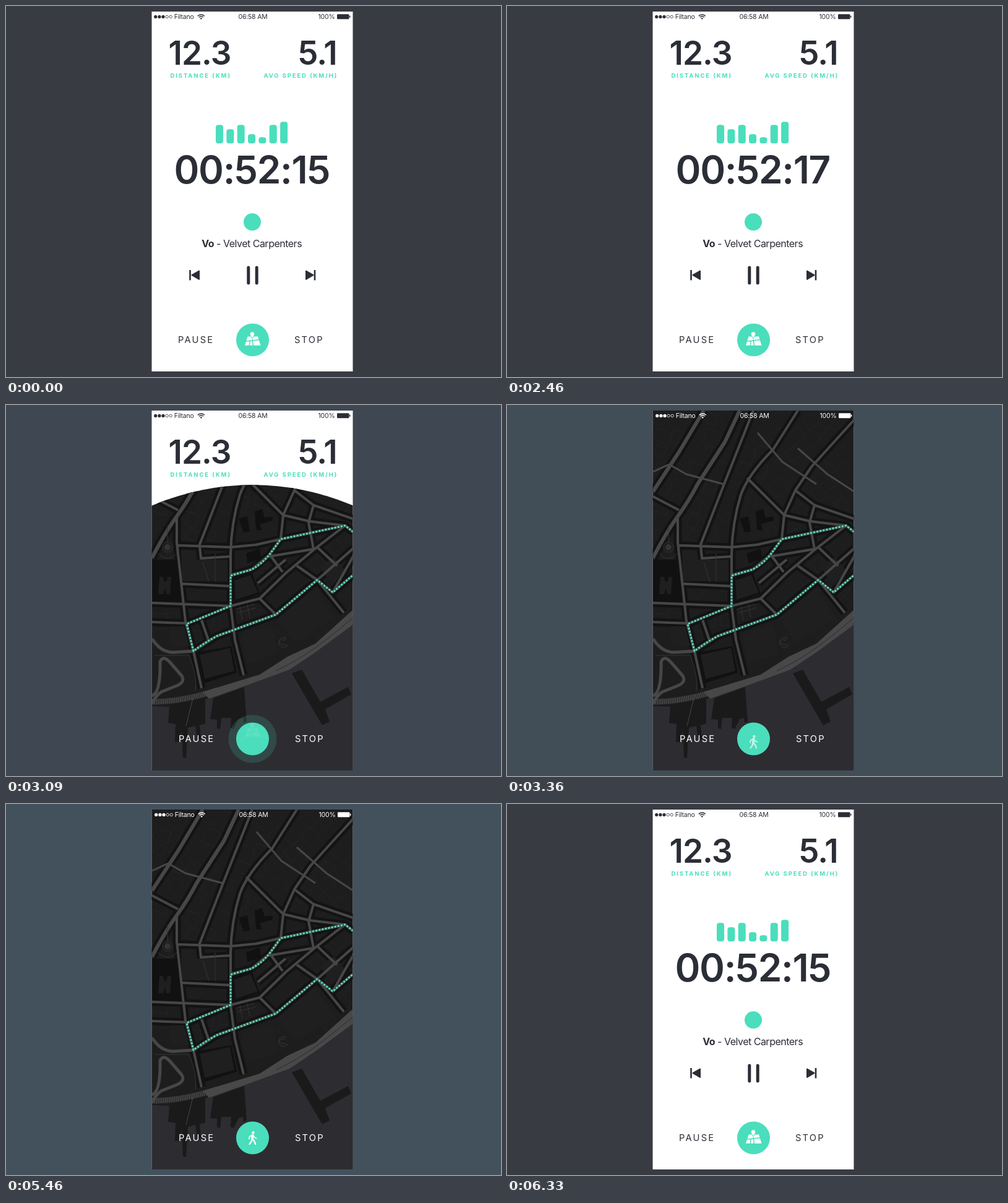
Write an HTML page that moves like this. It is 800x600 px and loops after 6360 ms.

```html
<!DOCTYPE html>
<html lang="en">
<head>
<meta charset="utf-8">
<title>Run tracker</title>
<style>
  html, body { margin: 0; width: 100%; height: 100%; overflow: hidden; background: #393b43; }
  svg { display: block; width: 800px; height: 600px; }
  text { font-family: Inter, "Open Sans", sans-serif; fill: currentColor; white-space: pre; }
  .num { font-weight: 600; }
  .cap { font-weight: 700; fill: #4adebc; }
  .road { fill: none; stroke: #474747; stroke-linejoin: round; }
</style>
</head>
<body>
<svg viewBox="0 0 800 600">
  <defs>
    <clipPath id="screen"><rect x="235.5" y="9" width="325" height="582"/></clipPath>
    <clipPath id="reveal"><circle id="hole" cx="398.5" cy="540" r="0"/></clipPath>
    <radialGradient id="glow">
      <stop offset="0" stop-color="#4adebc" stop-opacity=".5"/>
      <stop offset=".5" stop-color="#4adebc" stop-opacity=".16"/>
      <stop offset="1" stop-color="#4adebc" stop-opacity="0"/>
    </radialGradient>

    <!-- status bar and bottom labels, coloured by the layer that uses them -->
    <g id="chrome">
      <g fill="currentColor">
        <circle cx="241.7" cy="17.4" r="2.6"/><circle cx="247.9" cy="17.4" r="2.6"/><circle cx="254" cy="17.4" r="2.6"/>
        <rect x="535" y="13.3" width="19.5" height="8" rx="1.2"/><rect x="555" y="15.6" width="1.4" height="3.4" rx=".7"/>
        <circle cx="315.3" cy="20.3" r="1.2"/>
      </g>
      <g fill="none" stroke="currentColor">
        <circle cx="260.1" cy="17.4" r="2.2" stroke-width=".8"/><circle cx="266.2" cy="17.4" r="2.2" stroke-width=".8"/>
        <path d="M309.8 16.2a8 8 0 0 1 11 0M311.8 18.3a5 5 0 0 1 7 0" stroke-width="1.5"/>
      </g>
      <g font-size="10.5" letter-spacing="-.2">
        <text x="271.7" y="21.3">Filtano</text>
        <text x="375.5" y="21.3">06:58 AM</text>
        <text x="504.5" y="21.3">100%</text>
      </g>
      <g font-size="14.7" letter-spacing="2.2">
        <text x="278" y="545">PAUSE</text>
        <text x="466" y="545">STOP</text>
      </g>
    </g>

    <path id="streets" d="M276 180V222L290 350 303 398 316 458M312 228L352 125 398 9M363 325V240Q364 190 378 145 390 112 430 72L470 9
      M278 227L363 230 404 226 444 217M313 228L315 248 363 245M283 289L363 293M236 320L363 325M236 351L292 353
      M293 354L363 325 410 313 452 272 500 232 548 195M303 398L340 374 436 339 503 283 561 232
      M363 275L397 266 425 243 444 217 548 195 561 206M444 217L448 178 466 138 492 100 561 24
      M388 118L448 178 490 188 548 195M466 138L497 162 561 184M497 162L489 190 497 233 425 245M236 148L278 170
      M407 288L452 250M410 313L436 339M427 243L447 270M470 260L503 283 546 336M503 230L535 260M561 245L528 303 561 275
      M363 325L370 380 384 437M316 348L327 380"/>
    <path id="avenue" d="M236 247Q258 205 276 180T308 128L352 60 376 9M236 140L278 76 318 9"/>
    <path id="route" d="M561 205L548 195 444 217 425 243Q412 258 397 266L363 276V325L292 354 303 398Q320 385 340 374L436 339 503 283 528 303 561 275"/>
  </defs>

  <g clip-path="url(#screen)">
    <g color="#2b2e36">
      <rect x="235" y="9" width="326" height="583" fill="#fff"/>
      <use href="#chrome"/>
      <g class="num" font-size="53" letter-spacing="-1">
        <text x="262.6" y="95.3">12.3</text>
        <text x="472" y="95.3">5.1</text>
      </g>
      <g font-size="9.5" letter-spacing="1.9">
        <text class="cap" x="265.5" y="115.5">DISTANCE (KM)</text>
        <text class="cap" x="416.5" y="115.5">AVG SPEED (KM/H)</text>
      </g>
      <g id="bars" fill="#4adebc"></g>
      <text id="clock" class="num" x="397.3" y="286.5" font-size="62" letter-spacing="-1.3" text-anchor="middle"></text>
      <circle cx="398" cy="349.3" r="14" fill="#4adebc"/>
      <text x="397.2" y="390" font-size="16" letter-spacing="-.5" text-anchor="middle"><tspan font-weight="700">Vo</tspan> - Velvet Carpenters</text>
      <g fill="currentColor" stroke="currentColor" stroke-linejoin="round">
        <path d="M312 428.5V442L300.5 435.2ZM485 428.5V442L496.5 435.2Z" stroke-width="2"/>
        <path d="M297.5 427V443.4M499 427V443.4" stroke-width="2.6"/>
        <path d="M391.8 423V448M405.2 423V448" stroke-width="5" stroke-linecap="round"/>
      </g>
    </g>

    <g clip-path="url(#reveal)" color="#fff">
      <rect x="235" y="9" width="326" height="583" fill="#1d1d1d"/>
      <g id="lots" fill="none" stroke="#282828" stroke-width=".8"></g>
      <g fill="none" stroke="#131313">
        <use href="#streets" stroke-width="13"/>
        <use href="#avenue" stroke-width="15"/>
      </g>
      <g fill="#111">
        <path d="M236 250H278L283 318H236ZM308 400L364 390 373 433 320 450ZM402 172L414 168 418 182 431 180V187L410 193 414 203 404 202ZM376 184L390 180 394 205 384 206Z"/>
        <path d="M366 280L397 270 410 305 368 320ZM388 240L410 232 412 248 390 256Z"/>
      </g>
      <g fill="#1f1f1f">
        <path d="M313 404L362 393 369 430 321 443ZM380 372L431 356 440 402 389 419ZM440 344L500 296 531 345 465 385ZM369 284L395 275 407 303 371 315Z"/>
        <path d="M248 278H254L256 286H259L261 278H267L265 306H259L257 296 254 306H246ZM283 235H307V250H358V285H284ZM263 358H288L296 390H268ZM507 262L530 246 548 268 528 292Z"/>
      </g>
      <path d="M561 348L500 396 455 428 385 453 330 474 264 488 236 487V592H561Z" fill="#2d2c31"/>
      <path d="M264 487L322 469V515L313 518 315 541 309 540 306 519 294 522 291 571 286 570 284 526 280 545 273 545 274 516 262 514Z
        M335 474L385 456 389 512 384 514 383 506 376 508 368 524 363 522 364 506 348 506 346 524 341 523 341 509 330 508Z
        M462 434L478 428 508 480 553 456 558 468 516 492 523 512 511 518Z" fill="#1a1a1a"/>
      <path d="M303 470L291 519" stroke="#454545" fill="none"/>

      <g class="road">
        <use href="#avenue" stroke-width="6"/>
        <path d="M236 378Q250 400 270 400L303 398M236 470Q250 466 249 415 254 404 265 416L284 438Q290 448 276 454L256 462Q246 464 236 482" stroke-width="5"/>
        <use href="#streets" stroke-width="4"/>
        <path d="M405 45L445 92 500 128M236 108L262 96 290 112 350 128M470 70L518 112 561 140" stroke-width="3"/>
      </g>
      <g fill="none" stroke="#353535">
        <circle cx="261" cy="230" r="8"/><circle cx="261" cy="230" r="4.5" fill="#333"/>
        <path d="M246 240Q261 256 276 240M261 195V222M452 377A8 8 0 1 0 455 389L448 387A4 4 0 1 1 449 381Z"/>
        <path d="M240 405H296Q310 440 306 462M338 240V286M318 254L328 286M372 330L402 322M374 336L404 328M378 326L382 348M390 322L394 344"/>
      </g>
      <path d="M318 464L410 436 455 407 500 386 561 331V355L500 400 458 428 390 453 328 475Z" fill="#484848"/>
      <path d="M436 430Q474 412 502 391T561 344" fill="none" stroke="#2b2b2b"/>
      <path d="M236 480Q285 480 342 461" fill="none" stroke="#484848" stroke-width="9" stroke-dasharray="2 1"/>

      <g fill="none" stroke-linejoin="round">
        <use href="#route" stroke="#3a5a52" stroke-width="4"/>
        <use href="#route" stroke="#66dcc0" stroke-width="2.9" stroke-dasharray="2.8 2.4"/>
      </g>
      <g id="pin">
        <circle cx="2" cy="3" r="31" fill="url(#glow)"/><circle r="9.3" fill="#4adebc"/>
      </g>

      <use href="#chrome" x="1"/>
      <g id="head">
        <g class="num">
          <text x="263" y="63.7" font-size="22" letter-spacing="-.3">12.3</text>
          <text x="398" y="65" font-size="27" letter-spacing="-.5" text-anchor="middle">00:52:18</text>
          <text x="499.6" y="63.7" font-size="22" letter-spacing="-.3">5.1</text>
        </g>
        <g font-size="8" letter-spacing="1.3" text-anchor="middle">
          <text class="cap" x="285.5" y="78.5">DISTANCE</text><text class="cap" x="285.5" y="87.5">(KM)</text>
          <text class="cap" x="514" y="79">AVG SPEED</text><text class="cap" x="514" y="88">(KM/H)</text>
        </g>
        <path d="M357.3 77V84M363.6 82V84M369.8 84V84.1" stroke="#4adebc" stroke-width="4.4" stroke-linecap="round"/>
        <text x="378.3" y="83.7" font-size="7.2" letter-spacing="1.2">GOOD SIGNAL</text>
      </g>
    </g>

    <g transform="translate(398.5 540)">
      <circle id="halo" fill="#4adebc"/>
      <circle r="26.5" fill="#4adebc"/>
      <g id="mapIcon">
        <path d="M-8-5.5H8.5L13 9H-12.5Z" fill="#fff"/>
        <path d="M-13 2.5L13-.5M-.5-1L1 10M-4 1L-5.5 10" stroke="#4adebc" stroke-width="1.5"/>
        <path d="M-.5-2L-4.2-8.5A3.8 3.8 0 1 1 3.2-8.5Z" fill="#fff" stroke="#4adebc" stroke-width="1"/>
      </g>
      <g id="walker" fill="none" stroke="#fff" stroke-linecap="round" stroke-linejoin="round">
        <circle cx="1" cy="-8.7" r="2.2" fill="#fff" stroke="none"/>
        <path d="M0-4.5L-.5 2" stroke-width="4"/>
        <path d="M-.8 2L-2 6-5 10M0 2L3 5.5 4.5 10" stroke-width="2.3"/>
        <path d="M-1-4.5L-5-2-5.5 1.5M1-4L3-1 6 .5" stroke-width="1.8"/>
      </g>
    </g>
  </g>
</svg>
<script>
const LOOP = 6360;
const $ = id => document.getElementById(id);

// Value at time t on a line through [time, value] keys.
function at(t, ...keys) {
  if (t <= keys[0][0]) return keys[0][1];
  for (let i = 1; i < keys.length; i++) {
    const [t0, a] = keys[i - 1], [t1, b] = keys[i];
    if (t < t1) return a + (b - a) * (t - t0) / (t1 - t0);
  }
  return keys[keys.length - 1][1];
}

$('bars').innerHTML = [30, 23, 30, 15, 10, 30, 35].map((h, i) =>
  `<rect x="${339 + i * 17.35}" y="${222.3 - h}" width="12" height="${h}" rx="4"/>`).join('');

// Faint building outlines, aligned with the streets.
let seed = 11;
const rnd = () => (seed = seed * 16807 % 2147483647) / 2147483647;
let lots = '';
for (let y = 14; y < 390; y += 27) {
  for (let x = 238; x < 560; x += 27) {
    const turn = x > 400 ? -35 : y < 220 ? 22 : 2;
    lots += `<rect x="${x}" y="${y}" width="${15 + rnd() * 12}" height="${15 + rnd() * 11}"
      transform="rotate(${turn} ${x + 12} ${y + 12})" opacity="${.2 + rnd() * .6}"/>`;
  }
}
$('lots').innerHTML = lots;

function clockText(t) {
  const s = t >= 6330 || t < 900 ? 15 : t < 1860 ? 16 : t < 3600 ? 17 : 14;
  return '00:52:' + s;
}

function place(id, x, y, opacity, scale = 1) {
  $(id).setAttribute('transform', `translate(${x} ${y}) scale(${scale})`);
  $(id).setAttribute('opacity', opacity);
}

function draw(t) {
  const tint = at(t, [2700, 0], [2880, .3], [3090, .47], [3990, 1], [5010, 1], [5760, .67], [6300, 0]);
  const mix = (a, b) => Math.round(a + (b - a) * tint);
  document.body.style.background = `rgb(${mix(57, 70)},${mix(59, 87)},${mix(67, 98)})`;

  $('clock').textContent = clockText(t);
  $('hole').setAttribute('r', at(t, [2730, 0], [2880, 168], [3090, 410], [3300, 560], [3450, 620],
    [5430, 620], [5640, 470], [5760, 216], [5890, 0]));

  const halo = t < 4500
    ? at(t, [2800, 26], [2880, 29], [3090, 39], [3360, 48])
    : at(t, [5560, 26], [5760, 37.5], [6000, 48]);
  $('halo').setAttribute('r', halo);
  $('halo').setAttribute('opacity', at(halo, [26, .42], [29, .38], [38, .18], [48, 0]));

  const head = at(t, [3390, 0], [3780, 1], [5040, 1], [5370, 0]);
  place('head', 0, 10 * (1 - head) ** 2, head);
  const pin = at(t, [3480, 0], [3780, 1], [5040, 1], [5340, 0]);
  place('pin', 365.3, 275, pin, 1 - (1 - pin) ** 2);

  const up = at(t, [2730, 0], [2880, .55], [3090, .9], [3180, 1], [5600, 1], [5760, .42], [5940, 0]);
  place('mapIcon', 0, -14 * up, 1 - up);
  const walk = at(t, [3120, 0], [3480, 1], [5460, 1], [5760, .15], [5850, 0]);
  place('walker', 0, 14 * (1 - walk), walk);
}

function tick() {
  draw(performance.now() % LOOP);
  requestAnimationFrame(tick);
}
tick();
</script>
</body>
</html>
```
